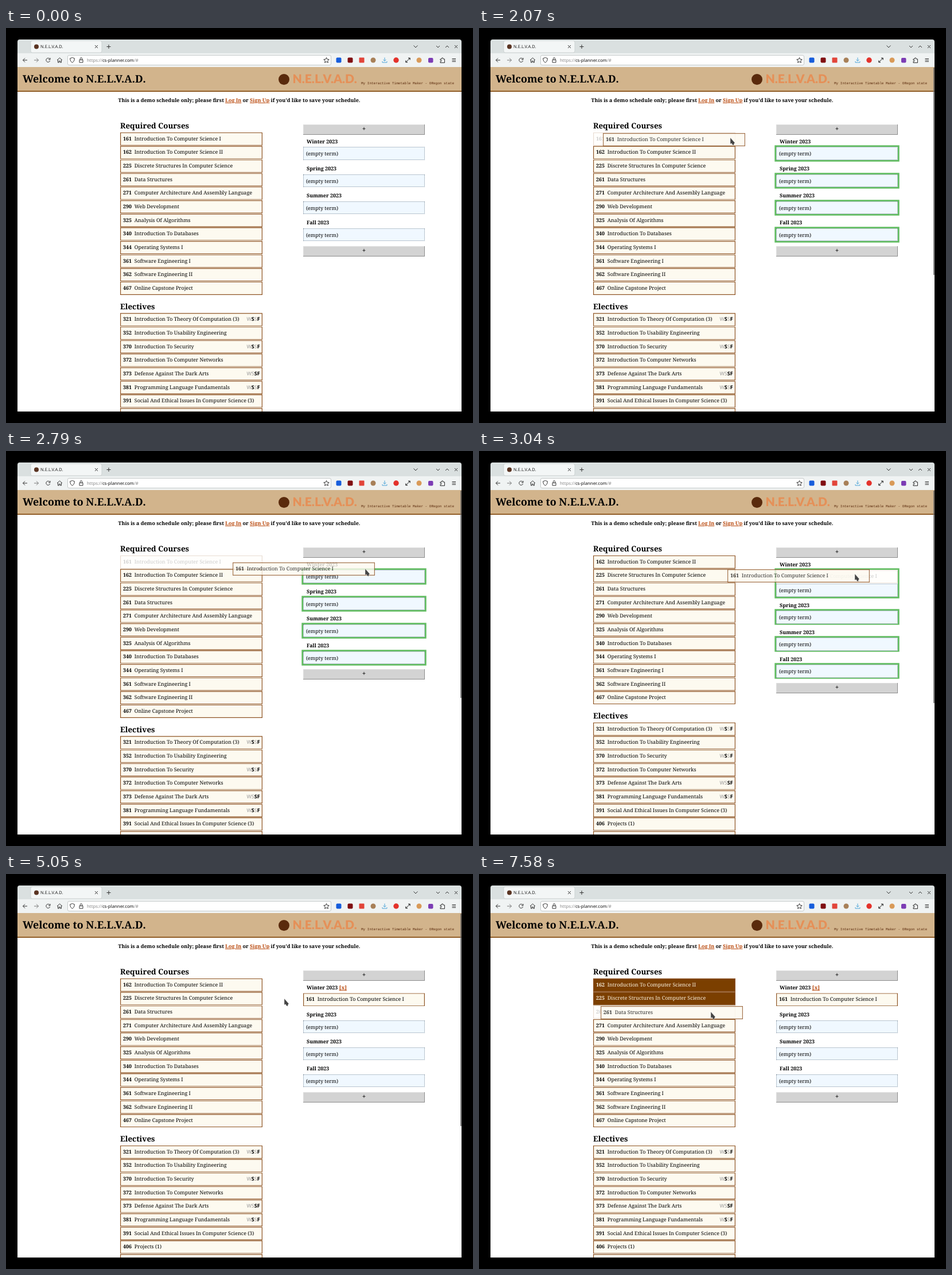
An HTML page that plays this animation: 814x688 px, repeating every 8 s.

```html
<!DOCTYPE html>
<html lang="en">
<head>
<meta charset="utf-8">
<title>Course planner</title>
<style>
  html, body { margin: 0; width: 100%; height: 100%; overflow: hidden; background: #000; }
  #stage {
    position: absolute; left: 0; top: 0; width: 814px; height: 688px; overflow: hidden;
    font: 8.95px/20px "Noto Serif", serif; color: #000;
    text-rendering: geometricPrecision; white-space: nowrap;
  }
  #stage div { position: absolute; box-sizing: border-box; }
  #chrome { position: absolute; left: 0; top: 0; }
  #chrome text { font-family: "Noto Sans", sans-serif; }
  #page { inset: 0; clip-path: inset(68px 20px 20px 20px); background: #fff; }
  #banner { left: 20px; top: 68px; width: 774px; height: 43px; background: #d2b48c; box-shadow: inset 0 -1.5px #7b3f00; }
  #mark { left: 475px; top: 80px; width: 19px; height: 19px; border-radius: 50%; background: #5a2a0c; }
  #wordmark { left: 499.5px; top: 79px; font: 900 21px/20px Lato, sans-serif; color: #e59058; }
  #tagline { left: 619px; top: 87px; font: 6px/20px "Liberation Mono", monospace; color: #5a2a0c; }
  .h1 { font-size: 17.9px; font-weight: bold; }
  .h2 { font-size: 13.4px; font-weight: bold; left: 199px; }
  #notice { left: 20px; width: 773px; top: 116px; text-align: center; font-weight: bold; }
  u { color: #b9480c; font-weight: bold; }

  .row {
    left: 199px; top: 0; translate: 0 calc(var(--y) + var(--shift, 0) * 23.64px);
    width: 247.6px; height: 22.5px; padding-left: 5px;
    line-height: 22.5px; background: #fdfaf0; box-shadow: inset 0 0 0 1.2px #8f5526;
  }
  .row b { margin-right: 4.8px; }
  .tags { position: absolute; right: 4px; font-family: "Noto Sans", sans-serif; font-weight: 300; color: #999; }
  .tags b { margin: 0; color: #000; }
  .slot { left: 518px; width: 211.8px; }
  .empty { height: 22.5px; padding-left: 4px; line-height: 21px; background: #f0f8ff; border: 1px dotted #8292a0; }
  .label { left: 524px; font-weight: bold; }
  .add {
    left: 518px; width: 211.8px; height: 18px; font: 10.5px/17px "Noto Sans", sans-serif; text-align: center;
    background: #d3d3d3; box-shadow: inset -1px -1px #8c8c8c, inset 1px 1px #dedede;
  }
  .ring { left: 518px; width: 211.8px; height: 22.5px; box-shadow: 0 0 0 2.7px #62bd62; }
  #bar { left: 792px; top: 68.5px; width: 1px; background: #666; box-shadow: 1px 0 #6668; }

  .ring, #bar, #rest, #terms, .anim { animation: 8s infinite step-end; }
  #rest { animation-name: rise; }
  #terms { animation-name: part; }
  .ring { animation-name: rings; }
  #ringA { animation-name: rings, grow; }
  #bar { animation-name: fade, stretch; }
  #first { animation-name: pickFirst; }
  #third { animation-name: pickThird; }
  .blocked { animation-name: block; }
  #slotEmpty { animation-name: leave; }
  #card { animation-name: land; }
  #close { animation-name: close; }
  #dragA { top: 182px; animation-name: showA, moveA; }
  #dragB { top: 229px; animation-name: showB, moveB; }
  #cursor { position: absolute; left: 0; top: 0; overflow: visible; animation-name: showCursor, travel; }

  @keyframes rise { 0% { --shift: 1 } 36.875%, 100% { --shift: 0 } }
  @keyframes part { 0% { top: 0 } 36.875% { top: 23.64px } 44.125%, 100% { top: 0 } }
  @keyframes rings { 0% { opacity: 0 } 22% { opacity: 1 } 44.125%, 100% { opacity: 0 } }
  @keyframes grow { 0% { height: 22.5px } 36.875%, 100% { height: 46.2px } }
  @keyframes stretch { 0% { height: 361px } 36.875%, 100% { height: 370px } }
  @keyframes fade {
    0% { opacity: 0 } 6.5% { opacity: 1 }
    51.375% { opacity: .7 } 52.375% { opacity: .35 } 54.25% { opacity: 0 }
    59.375% { opacity: 1 }
    90.75% { opacity: .8 } 91.75% { opacity: .6 } 92.75% { opacity: .4 } 93.75% { opacity: .2 }
    94.75%, 100% { opacity: 0 }
  }
  @keyframes pickFirst { 0% { opacity: 1 } 22% { opacity: .2 } 36.875%, 100% { opacity: 0 } }
  @keyframes pickThird { 0% { opacity: 1 } 75.375%, 100% { opacity: .2 } }
  @keyframes block {
    0% { background: #fdfaf0; color: #000 }
    75.375%, 100% { background: #7b3f00; color: #fdf5e6 }
  }
  @keyframes leave {
    0% { top: 207.4px; opacity: 1 } 36.875% { top: 231px; opacity: 1 }
    44.125%, 100% { top: 231px; opacity: 0 }
  }
  @keyframes land { 0% { opacity: 0 } 36.875% { opacity: .2 } 44.125%, 100% { opacity: 1 } }
  @keyframes close { 0% { opacity: 0 } 44.125%, 100% { opacity: 1 } }
  @keyframes showA { 0% { opacity: 0 } 22% { opacity: .8 } 44.125%, 100% { opacity: 0 } }
  @keyframes showB { 0% { opacity: 0 } 75.375%, 100% { opacity: .8 } }
  @keyframes showCursor { 0% { opacity: 0 } 6.5%, 100% { opacity: 1 } }
  @keyframes moveA {
    0% { translate: 0 0 }
    21% { translate: 0 0; animation-timing-function: steps(5) }
    25.875% { translate: 17px 1px }
    27% { translate: 19px 0 }
    28% { translate: 19px 0; animation-timing-function: steps(2) }
    30% { translate: 60px -4px; animation-timing-function: steps(5) }
    34.875% { translate: 196px 12px; animation-timing-function: steps(3) }
    38%, 100% { translate: 234px 24px }
  }
  @keyframes moveB {
    0% { translate: 0 0 }
    74.375% { translate: 0 0; animation-timing-function: steps(3) }
    77.375%, 100% { translate: 13px 1px }
  }
  @keyframes travel {
    0% { translate: 215px 330px }
    6.5% { translate: 215px 330px; animation-timing-function: steps(10) }
    16.125% { translate: 429px 192px; animation-timing-function: steps(4) }
    20.125% { translate: 421px 190px }
    21% { translate: 421px 190px; animation-timing-function: steps(5) }
    25.875% { translate: 438px 191px }
    27% { translate: 440px 190px }
    28% { translate: 440px 190px; animation-timing-function: steps(2) }
    30% { translate: 486px 186px; animation-timing-function: steps(5) }
    34.875% { translate: 626px 205px; animation-timing-function: steps(3) }
    38% { translate: 655px 214px }
    58.4375% { translate: 655px 214px; animation-timing-function: steps(5) }
    63.125% { translate: 485px 217px; animation-timing-function: steps(6) }
    69.125% { translate: 401px 223px; animation-timing-function: steps(2) }
    71.25% { translate: 391px 239px }
    74.375% { translate: 391px 239px; animation-timing-function: steps(3) }
    77.375%, 100% { translate: 404px 240px }
  }
</style>
</head>
<body>
<div id="stage">
  <div id="page">
    <div id="banner"></div>
    <div class="h1" style="left:29px;top:79px">Welcome to N.E.L.V.A.D.</div>
    <div id="mark"></div>
    <div id="wordmark">N.E.L.V.A.D.</div>
    <div id="tagline">My Interactive Timetable Maker - ORegon state</div>
    <div id="notice">This is a demo schedule only; please first <u>Log In</u> or <u>Sign Up</u> if you'd like to save your schedule.</div>
    <div class="h2" style="top:160px">Required Courses</div>
    <div id="first" class="anim"></div>
    <div id="rest"></div>

    <div class="add" style="top:168px">+</div>
    <div class="label" style="top:188px">Winter 2023 <u id="close" class="anim">[x]</u></div>
    <div id="ringA" class="ring" style="top:207.4px"></div>
    <div id="slotEmpty" class="slot empty anim">(empty term)</div>
    <div id="card" class="anim"></div>
    <div id="terms"><div class="add" style="top:380px">+</div></div>

    <div id="dragA" class="anim"></div>
    <div id="dragB" class="anim"></div>
    <div id="bar"></div>
  </div>

  <svg id="chrome" width="814" height="688" fill="none" stroke="#333" stroke-width="1">
    <g stroke="none">
      <path d="M20 44V24q0-4 4-4H790q4 0 4 4V44Z" fill="#dae0e0"/>
      <path d="M20 44H794V68H20Z" fill="#f0f3f3"/>
      <rect x="43" y="22" width="124" height="21" rx="3" fill="#f3f6f6" stroke="#c3caca" stroke-width=".7"/>
      <rect x="107.5" y="47.5" width="459" height="17" rx="2.5" fill="#fff" stroke="#c3c8c8"/>
      <circle cx="53" cy="32.5" r="4" fill="#5a3422"/>
      <text x="60" y="35.4" font-size="7.5" fill="#222">N.E.L.V.A.D.</text>
      <text x="141" y="59" font-size="7.8" fill="#888">https://<tspan fill="#111">cs-planner.com</tspan>/#</text>
    </g>
    <path d="M155 30l5 5m0-5l-5 5M175.500 32.500h7m-3.500-3.500v7M710.500 30.500l3.500 3.500 3.500-3.500M750 31l3 3 3-3M766 34l3-3 3 3M782 30l5 5m0-5l-5 5"/>
    <path d="M37 56H29.500m3.500-3.500L29.500 56l3.500 3.500"/>
    <path d="M49 56h7.500M53 52.500L56.500 56 53 59.500" stroke="#777"/>
    <path d="M76.300 54A3.500 3.500 0 1 0 76.700 57M77 52v3h-3"/>
    <path d="M89 56l4.500-4 4.500 4M90.500 55.500V60h2v-2.500h2V60h2V55.500"/>
    <path d="M115.500 51.500l4 1.500q0 5-4 7.500-4-2.500-4-7.500Z"/>
    <path d="M128 55.500h6V60h-6ZM129.300 55v-1.500a1.700 1.700 0 0 1 3.400 0V55"/>
    <path d="M558.500 51.500l1.400 3 3.300.4-2.500 2.200.7 3.300-2.900-1.700-2.900 1.700.7-3.300-2.500-2.200 3.300-.4Z"/>
    <g stroke="none">
      <rect x="575.500" y="51.500" width="9" height="9" rx="2" fill="#175ddc"/>
      <rect x="595.500" y="51.500" width="9" height="9" rx="2" fill="#800f12"/>
      <rect x="615.500" y="51.500" width="9" height="9" rx="1" fill="#e2453a"/>
      <circle cx="640" cy="56" r="4.500" fill="#a88058"/>
      <circle cx="680" cy="56" r="4.700" fill="#e4322b"/>
      <circle cx="720" cy="56" r="4.500" fill="#d99a58"/>
      <rect x="736" y="52" width="8.500" height="8.500" rx="2" fill="#7c3cb4"/>
    </g>
    <path d="M660 51.500v6m-2.500-2.500l2.500 2.500 2.500-2.500M656 58v2h8v-2" stroke="#4aa3d8"/>
    <path d="M697 59.500l7-7M701 52.300h3.200v3.200M696.800 56.500v3.200h3.200" stroke="#111"/>
    <path d="M757 54h2.500v-1a1.200 1.200 0 0 1 2.400 0v1h2.600v6.500H757V58.300h1a1.100 1.100 0 0 0 0-2.200h-1Z"/>
    <path d="M777.500 53.500h6.500M777.500 56h6.500M777.500 58.500h6.500"/>
  </svg>

  <svg id="cursor" class="anim" width="10" height="15">
    <path d="M0 0V11L2.400 9.800 3.800 12.600 6.200 13.200 6.500 10.500 8 9Z" fill="#444" stroke="#eee" stroke-width=".4"/>
  </svg>
</div>

<script>
  const PITCH = 23.64, TOP = 181.85, ELECTIVES = 472.85, SLOT = 207.4;

  const required = [
    "162 Introduction To Computer Science II",
    "225 Discrete Structures In Computer Science",
    "261 Data Structures",
    "271 Computer Architecture And Assembly Language",
    "290 Web Development",
    "325 Analysis Of Algorithms",
    "340 Introduction To Databases",
    "344 Operating Systems I",
    "361 Software Engineering I",
    "362 Software Engineering II",
    "467 Online Capstone Project"
  ];
  // Lower-case letters are terms without the course.
  const electives = [
    "321 Introduction To Theory Of Computation (3)|wSsF",
    "352 Introduction To Usability Engineering",
    "370 Introduction To Security|wSsF",
    "372 Introduction To Computer Networks",
    "373 Defense Against The Dark Arts|wsSF",
    "381 Programming Language Fundamentals|wSsF",
    "391 Social And Ethical Issues In Computer Science (3)",
    "406 Projects (1)",
    "450 Computer Graphics"
  ];
  const intro = "161 Introduction To Computer Science I";
  const $ = id => document.getElementById(id);

  function fillRow(el, course, y = 0) {
    const [name, tags = ""] = course.split("|");
    const marks = [...tags].map(c => c < "a" ? `<b>${c}</b>` : c.toUpperCase()).join("");
    el.classList.add("row");
    el.style.setProperty("--y", y + "px");
    el.innerHTML = `<b>${name.slice(0, 3)}</b>${name.slice(4)}<span class="tags">${marks}</span>`;
  }

  function add(parent, className, text = "") {
    const el = document.createElement("div");
    el.className = className;
    el.textContent = text;
    parent.append(el);
    return el;
  }

  const rest = $("rest");
  required.forEach((course, i) => {
    const row = add(rest, i < 2 ? "anim blocked" : "");
    fillRow(row, course, TOP + i * PITCH);
    if (i === 2) {
      row.classList.add("anim");
      row.id = "third";
    }
  });
  const heading = add(rest, "h2", "Electives");
  heading.style.top = `calc(451.3px + var(--shift) * ${PITCH}px)`;
  electives.forEach((course, i) => fillRow(add(rest, ""), course, ELECTIVES + i * PITCH));

  fillRow($("first"), intro, TOP);
  fillRow($("dragA"), intro);
  fillRow($("dragB"), required[2]);
  fillRow($("card"), intro, SLOT);
  $("card").classList.add("slot");

  ["Spring 2023", "Summer 2023", "Fall 2023"].forEach((term, i) => {
    const y = (i + 1) * 47.1;
    add($("terms"), "label", term).style.top = 188 + y + "px";
    add($("terms"), "ring").style.top = SLOT + y + "px";
    add($("terms"), "slot empty", "(empty term)").style.top = SLOT + y + "px";
  });
</script>
</body>
</html>
```
